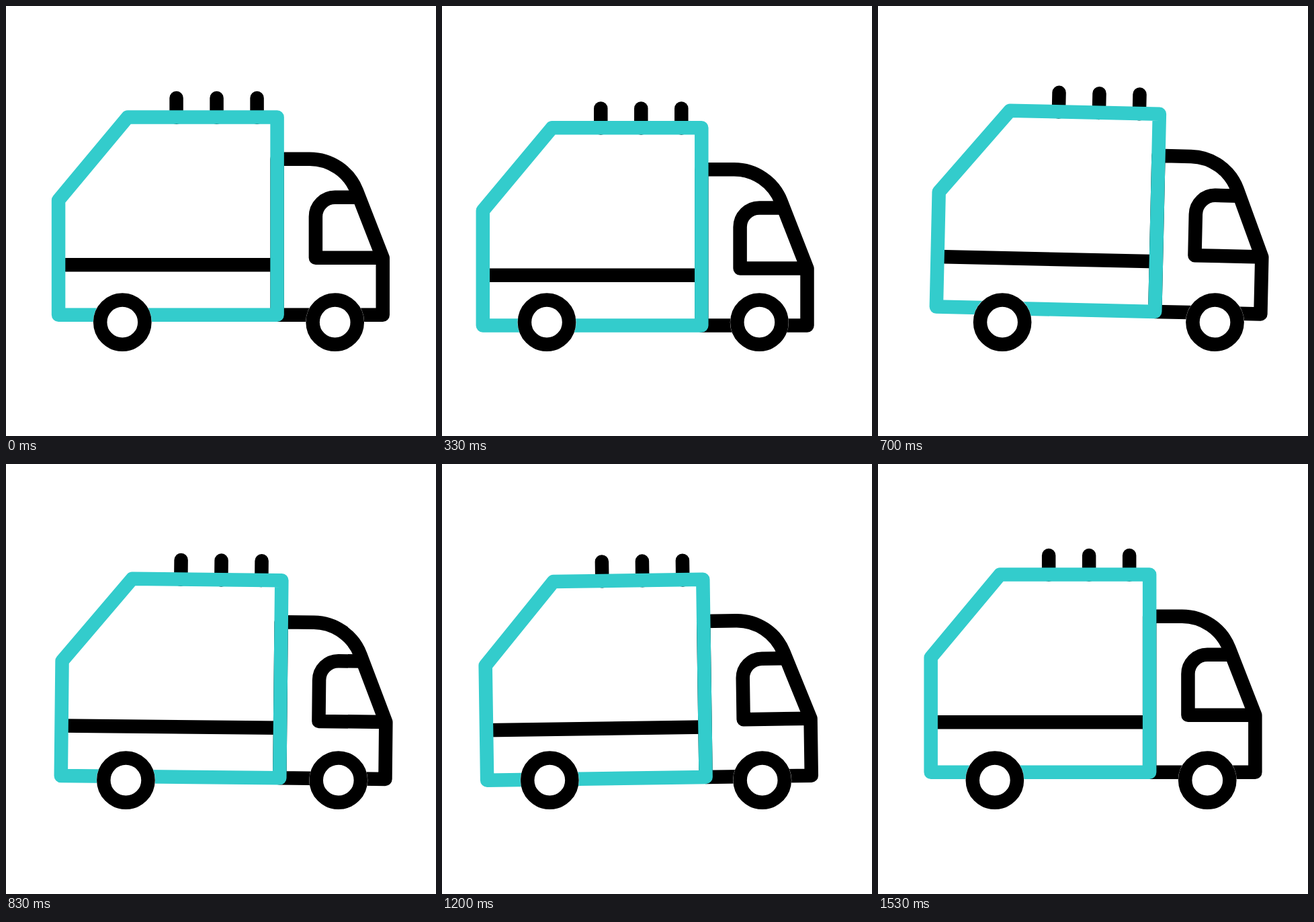
Animation, 640 px wide and 640 px high, one loop 1.67 s. Source, as an HTML page:

```html
<!DOCTYPE html>
<html lang="en">
<head>
<meta charset="utf-8">
<title>Truck</title>
<style>
  html, body { margin: 0; height: 100%; overflow: hidden; background: #fff; }
  svg { display: block; width: 100%; height: 100%; }
</style>
</head>
<body>
<svg viewBox="-.65 0 640 640" fill="none" stroke="#000" stroke-width="20.5" stroke-linejoin="round">
  <defs>
    <path id="lamp" stroke-linecap="round" d="M253.5 136v28.8"/>
    <g id="wheel">
      <circle r="43.6" fill="#fff" stroke="none"/>
      <circle r="33.1"/>
    </g>
  </defs>
  <g id="body">
    <use href="#lamp"/>
    <use href="#lamp" x="60"/>
    <use href="#lamp" x="120"/>
    <path d="M403.5 226.7H452a75 75 0 0 1 69.9 47.8L560.7 374v84.8H403.5Z"/>
    <path d="M525 283.8H489.5a28.7 28.7 0 0 0-28.7 28.7V373.8h99.7M78 384.2H403.5"/>
    <path stroke="#3cc" d="M403.5 164.6H181L78 288V458.8H403.5Z"/>
  </g>
  <g id="wheels">
    <use href="#wheel" x="173.2" y="470.7"/>
    <use href="#wheel" x="489.6" y="470.7"/>
  </g>
</svg>
<script>
  const LOOP = 1670, STEPS_PER_MS = .03, LAST_STEP = 46;
  const body = document.getElementById('body');
  const wheels = document.getElementById('wheels');

  const smooth = u => u * u * (3 - 2 * u);

  // Leaves rest at start, eases through the [step, value] peaks and is back at rest at end
  const swing = (start, end, ...peaks) => step => {
    let from = [start, 0];
    for (const to of [...peaks, [end, 0]]) {
      if (step < to[0]) {
        const u = Math.max(0, (step - from[0]) / (to[0] - from[0]));
        return from[1] + (to[1] - from[1]) * smooth(u);
      }
      from = to;
    }
    return 0;
  };

  const drive = swing(-1.2, 45, [10, -17.85], [20.5, 11.35], [34, -14.85]);
  const bounce = swing(-1.7, 41.5, [10, 16.6], [18.6, -9], [29.8, 18.5]);
  const tilt = swing(10, 42.5, [20.5, 1.3], [33, -1.1]);

  function draw() {
    const time = performance.now() % LOOP;
    const step = Math.min(LAST_STEP, Math.floor(time * STEPS_PER_MS + .15));
    const x = drive(step);
    body.setAttribute('transform', `translate(${x} ${bounce(step)}) rotate(${tilt(step)} 320 320)`);
    wheels.setAttribute('transform', `translate(${x})`);
    requestAnimationFrame(draw);
  }
  draw();
</script>
</body>
</html>
```
